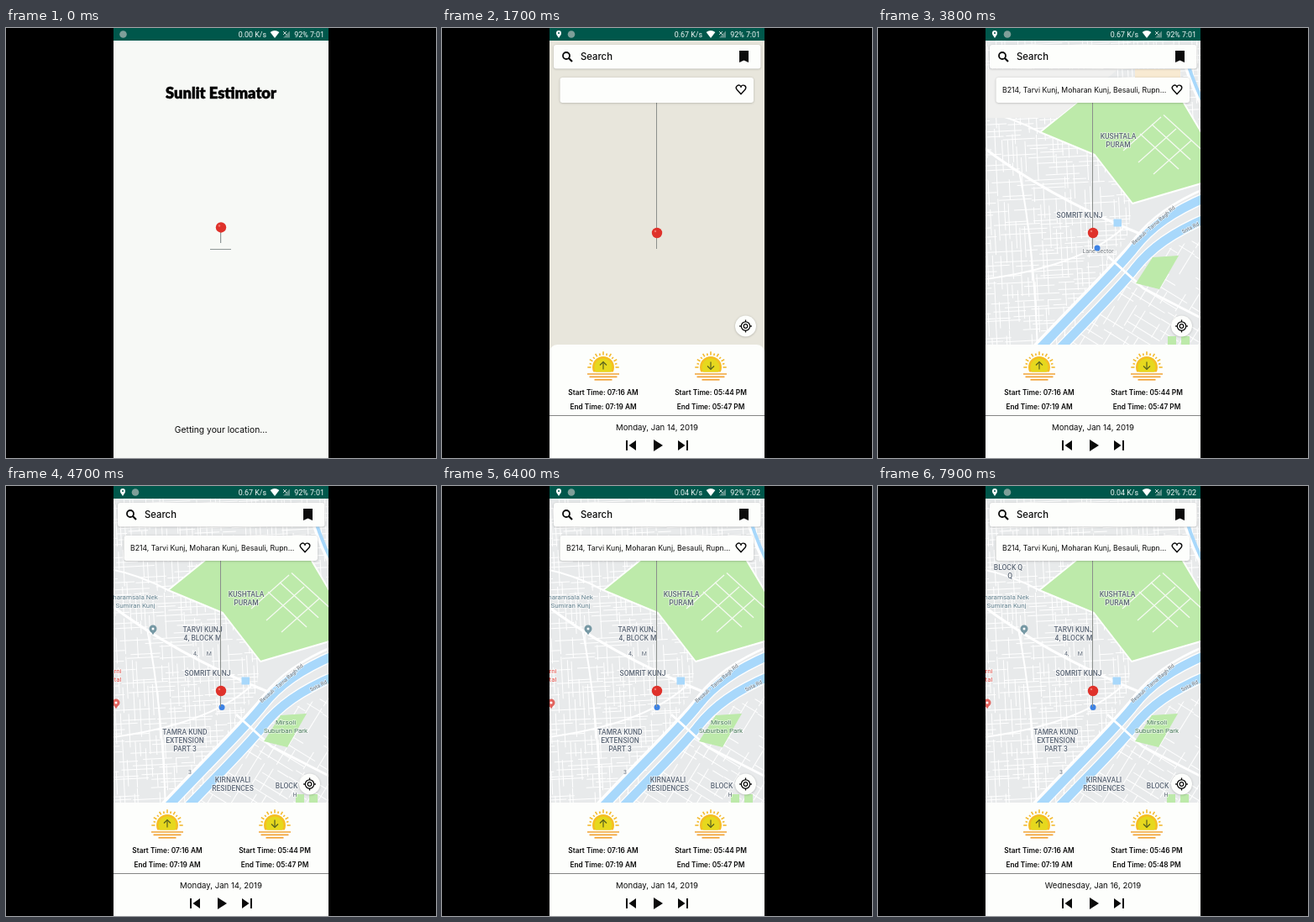
These frames come from a looping animation (512 by 512 pixels, 8 s). An HTML page with a canvas:

```html
<!DOCTYPE html>
<html lang="en">
<head>
<meta charset="utf-8">
<title>Sunlit Estimator</title>
<style>
html, body { margin: 0; width: 100%; height: 100%; overflow: hidden; background: #000; }
canvas { display: block; width: 100vw; height: 100vh; }
</style>
</head>
<body>
<canvas id="stage" width="512" height="512"></canvas>
<script>
const LOOP = 8000, TAU = Math.PI * 2;
const LEFT = 128, WIDTH = 256, MID = 256, TOP = 15, PANEL = 377;
const UI = 'Inter, "Open Sans", sans-serif', MAP = 'Roboto, Arial, sans-serif';
const INK = '#0b0b0b', WHITE = '#fdfefc', LAND = '#e8eaeb', WATER = '#a8d8fb', PARK = '#bdeaaa';
const SLATE = '#5d6877', TEAL = '#00574b';
const BIG = '500 8.5px ' + MAP, PLACE = '8px ' + MAP, SMALL = '7px ' + MAP;
const stage = document.getElementById('stage').getContext('2d');
let c = stage;

const ramp = (t, from, to) => Math.max(0, Math.min(1, (t - from) / (to - from)));
const mix = (a, b, k) => a + (b - a) * k;

function fill(color) { c.fillStyle = color; c.fill(); }
function stroke(color, width) { c.strokeStyle = color; c.lineWidth = width; c.stroke(); }
function trace(...pts) {
  c.beginPath();
  for (let i = 0; i < pts.length; i += 2) c.lineTo(pts[i], pts[i + 1]);
}
function poly(color, ...pts) { trace(...pts); fill(color); }
function line(color, width, ...pts) { trace(...pts); stroke(color, width); }
function rect(color, x, y, w, h) { c.fillStyle = color; c.fillRect(x, y, w, h); }
function circle(x, y, r) { c.beginPath(); c.arc(x, y, r, 0, TAU); }
function disc(color, x, y, r) { circle(x, y, r); fill(color); }
function ring(color, width, x, y, r) { circle(x, y, r); stroke(color, width); }
function curve(color, width, x0, y0, cx, cy, x1, y1) {
  c.beginPath();
  c.moveTo(x0, y0);
  c.quadraticCurveTo(cx, cy, x1, y1);
  stroke(color, width);
}
function text(str, x, y, font, color = INK, align = 'center') {
  c.font = font;
  c.textAlign = align;
  c.fillStyle = color;
  c.fillText(str, x, y);
}
function group(draw, alpha = 1) {
  if (alpha <= 0) return;
  c.save();
  c.globalAlpha *= alpha;
  draw();
  c.restore();
}
function clipBox(x, y, w, h) {
  c.beginPath();
  c.rect(x, y, w, h);
  c.clip();
}
function shadowed(draw) {
  group(() => {
    c.shadowColor = 'rgba(0,0,0,.25)';
    c.shadowBlur = 2.5;
    c.shadowOffsetY = 0.5;
    draw();
  });
}
function card(x, y, w, h) {
  shadowed(() => {
    c.beginPath();
    c.roundRect(x, y, w, h, 3);
    fill(WHITE);
  });
}
function rng(seed) {
  return () => (seed = (seed * 16807) % 2147483647) / 2147483647;
}

// Short broken streets running both ways around a centre
function streets(cx, cy, angle, span, gap, seed) {
  const rand = rng(seed);
  group(() => {
    c.translate(cx, cy);
    for (const turn of [angle, angle + TAU / 4]) {
      group(() => {
        c.rotate(turn);
        for (let y = -span; y < span; y += gap) {
          for (let x = -span; x < span;) {
            const len = 12 + rand() * 45, off = y + (rand() - 0.5) * 4;
            if (rand() < 0.68) line('#fff', 1, x, off, x + len, off);
            x += len + rand() * 8;
          }
        }
      });
    }
  });
}

function park() {
  trace(193, 124, 240, 86, 350, 66, 364, 89, 392, 136, 392, 183, 303, 209, 258, 151);
  c.closePath();
  fill(PARK);
  stroke('#fff', 2);
  for (let i = 0; i < 3; i++) {
    const a = 18 * i, b = 14 * i;
    line('#f4faf0', 1.4, 292 + a, 146 + b, 337 + a, 106 + b);
    line('#f4faf0', 1.4, 312 + b, 126 - b * 0.8, 358 + b, 168 - b * 0.8);
  }
}

function canal(color, width, shift) {
  c.beginPath();
  c.moveTo(392, 198 + shift);
  c.bezierCurveTo(350, 216 + shift, 325, 234 + shift, 306, 258 + shift);
  c.bezierCurveTo(290, 280 + shift, 240, 328 + shift, 184, 388 + shift);
  stroke(color, width);
}

function buildMap() {
  const layer = document.createElement('canvas');
  layer.width = layer.height = 512;
  c = layer.getContext('2d');
  c.lineJoin = 'round';
  rect(LAND, 0, 0, 512, 512);
  streets(190, 200, -0.05, 200, 6, 71);
  poly(LAND, 303, 205, 400, 170, 400, 400, 210, 400, 298, 245);
  group(() => {
    trace(400, 245, 330, 268, 215, 385, 400, 385);
    c.clip();
    streets(310, 330, 0.55, 120, 11, 19);
  });
  curve('#fff', 3, 120, 138, 200, 200, 312, 245);
  curve('#fff', 2, 168, 170, 186, 260, 190, 385);
  curve('#fff', 2, 120, 300, 240, 285, 292, 238);
  curve('#fff', 2, 120, 98, 160, 106, 193, 124);
  park();
  curve('#fff', 7, 366, 40, 376, 72, 394, 106);
  curve(WATER, 4, 368, 40, 378, 72, 394, 102);
  canal('#fff', 2.5, -8);
  for (const shift of [3, 28]) {
    canal('#fff', 13, shift);
    canal(WATER, 10.5, shift);
  }
  line('#fff', 3, 274, 272, 316, 310, 392, 349);
  rect(WATER, 280.5, 227.5, 9.5, 9);
  poly(PARK, 307, 304, 327, 273, 358, 271, 335, 311);
  for (const x of [345, 361]) rect(PARK, x, 367, 10, 12);
  c = stage;
  return layer;
}

function label(str, x, y, color = SLATE, font = BIG) {
  str.split('|').forEach((s, i) => {
    const base = y + 3 + i * 10;
    c.font = font;
    c.textAlign = 'center';
    c.lineWidth = 1.6;
    c.strokeStyle = 'rgba(255,255,255,.6)';
    c.strokeText(s, x, base);
    text(s, x, base, font, color);
  });
}
function roadName(str, x, y, angle) {
  group(() => {
    c.translate(x, y);
    c.rotate(angle);
    label(str, 0, -1, '#666d74', '6.3px ' + MAP);
  });
}
function marker(color, x, y, r = 4.5) {
  poly(color, x - r * 0.9, y + 1, x + r * 0.9, y + 1, x, y + r * 1.6);
  disc(color, x, y, r);
  disc('#fff', x, y, r / 3);
}

function detailLabels() {
  label('haramsala Nek|Sumiran Kunj', 154, 132, '#62808e', PLACE);
  marker('#7698a4', 175, 170);
  label('rni|tal', 133, 220, '#e2524b', PLACE);
  marker('#e2645e', 131, 258);
  label('TARVI KUNJ|4, BLOCK M', 234, 171);
  label('4,      M', 234, 199, SLATE, SMALL);
  label('TAMRA KUND|EXTENSION|PART 3', 213, 293);
  label('3', 219, 340, SLATE, SMALL);
  label('KIRNAVALI|RESIDENCES', 270, 350);
  label('BLOCK', 334, 357);
  label('H', 344, 367, SLATE, SMALL);
  label('Mirsoli|Suburban Park', 333, 281, '#48795a', PLACE);
}

let city;
function drawMap(t) {
  rect('#e8e6dc', LEFT, TOP, WIDTH, 375);
  group(() => {
    rect(WHITE, LEFT, PANEL, WIDTH, 13);
    clipBox(LEFT, TOP, WIDTH, PANEL - TOP);
    const detail = ramp(t, 4000, 4300), k = ramp(t, 3900, 4600);
    c.translate(-ramp(t, 6150, 6350), 0);
    c.drawImage(city, 0, 0);
    group(() => {
      poly('#f0f0ef', 120, 49, 286, 49, 214, 107, 120, 107);
      rect('#f8ead2', 306, 49, 54, 10);
      label('Lane Sector', 262, 265, '#777d83', SMALL);
    }, 1 - detail);
    label('KUSHTALA|PURAM', 286, 129);
    label('SOMRIT KUNJ', 240, 223);
    roadName('Besauli - Tarna Bagh Rd', 328, 235, -0.72);
    roadName('Sota Rd', 372, 238, -0.47);
    group(detailLabels, detail);
    group(() => label('BLOCK Q|  Q', 156, 97), ramp(t, 7200, 7400));
    disc('#3c82e4', mix(261, 257, k), mix(262, 263.5, k), 3.5);
  }, ramp(t, 2750, 2950));
}

function pinHead(y) {
  disc('#df322b', MID, y, 6.2);
  disc('#f0796f', MID - 2, y - 2, 1.2);
}

function statusBar(t, onMap) {
  rect(TEAL, LEFT, 0, WIDTH, TOP);
  const font = '8.9px ' + MAP, pale = '#f4f8f7';
  disc('#7f9f99', onMap ? 154 : 139.5, 7.5, 4.3);
  if (onMap) {
    poly('#fff', 136.2, 7.4, 141.8, 7.4, 139, 12);
    disc('#fff', 139, 6, 3);
    disc(TEAL, 139, 6, 1);
  }
  const rate = !onMap ? '0.00' : t < 5400 ? '0.67' : '0.04';
  text(rate + ' K/s', 310, 11, font, pale, 'right');
  c.beginPath();
  c.moveTo(320, 12);
  c.arc(320, 12, 8.8, -TAU * 0.355, -TAU * 0.145);
  fill('#fff');
  poly('#5f918a', 330, 11.5, 338, 11.5, 338, 3.5);
  line('#dce8e6', 0.9, 330, 4, 334, 8);
  line('#dce8e6', 0.9, 334, 4, 330, 8);
  text('92% ' + (t < 6300 ? '7:01' : '7:02'), 379, 11, font, pale, 'right');
}

function splash(t) {
  rect('#f7f9f6', LEFT, TOP, WIDTH, 497);
  const title = 'Sunlit Estimator';
  text(title, MID, 83.5, '900 18.3px Lato, sans-serif', '#000');
  c.strokeStyle = '#000';
  c.lineWidth = 0.5;
  c.strokeText(title, MID, 83.5);
  text('Getting your location...', MID, 481.5, '10.3px ' + UI);
  // The pin hops once a second, then rests on the ground line
  const lift = t < 1300 ? 5 * (1 - Math.cos((t - 300) / 1000 * TAU)) : 0;
  line('#8e9696', 1, 243, 263.5, 268, 263.5);
  line('#8e9696', 1.2, 255.6, 244 - lift, 255.6, 262.5 - lift);
  pinHead(244 - lift);
}

function sun(x, dir) {
  const y = 404;
  group(() => {
    clipBox(x - 20, y - 20, 40, 25.5);
    disc('#f5be22', x, y, 13);
    disc('#e6d81e', x, y, 10.5);
  });
  const rays = 12;
  for (let i = 0; i <= rays; i++) {
    const a = Math.PI * (1 + i / rays), far = i % 2 ? 17 : 18.7, dx = Math.cos(a), dy = Math.sin(a);
    line('#f3b92c', 1.6, x + dx * 14.5, y + dy * 14.5, x + dx * far, y + dy * far);
  }
  for (let i = 0; i < 3; i++) {
    const half = 19 - 1.7 * i * (i + 0.5);
    line('#f2a336', 1.7, x - half, y + 8 + i * 3.4, x + half, y + 8 + i * 3.4);
  }
  const tip = y - 2 - dir * 4.5;
  line('#55601f', 1.2, x, tip + dir * 9, x, tip);
  line('#55601f', 1.2, x - 4, tip + dir * 4, x, tip, x + 4, tip + dir * 4);
}

function times(x, start, end) {
  const font = '600 8.3px ' + UI;
  text('Start Time: ' + start, x, 437, font);
  text('End Time: ' + end, x, 454, font);
}
function triangle(x, dir, w, h) {
  poly(INK, x, 497 - h, x, 497 + h, x + dir * w, 497);
}

const DAYS = ['Monday', 'Tuesday', 'Wednesday'];
const nextAt = n => 6100 + 700 * n;

function panel(t) {
  c.beginPath();
  c.roundRect(LEFT, PANEL, WIDTH, 135, [9, 9, 0, 0]);
  fill(WHITE);
  const n = t < nextAt(1) ? 0 : t < nextAt(2) ? 1 : 2;
  sun(192, 1);
  sun(320, -1);
  times(192, '07:16 AM', '07:19 AM');
  times(320, `05:${44 + n} PM`, `05:${47 + (n >> 1)} PM`);
  line('#858585', 1, LEFT, 461.5, LEFT + WIDTH, 461.5);
  text(`${DAYS[n]}, Jan ${14 + n}, 2019`, MID, 478.7, '9.6px ' + UI);
  // Tap ripple under the next button
  for (const press of [1, 2]) {
    const k = (t - nextAt(press) + 100) / 350;
    if (k > 0 && k < 1) disc(`rgba(0,0,0,${0.16 * (1 - k)})`, 287, 497, 5 + 6 * k);
  }
  triangle(231, -1, 8.5, 6);
  triangle(252, 1, 11, 7);
  triangle(281, 1, 8.5, 6);
  for (const x of [219, 291]) rect(INK, x, 491, 2, 12);
}

function searchBar() {
  card(133, 20, 246.5, 28.5);
  ring(INK, 1.8, 148, 33, 4);
  line(INK, 2.2, 151, 36, 155, 40);
  text('Search', 165, 38.2, '500 11.3px ' + UI, INK, 'left');
  poly(INK, 354, 27, 365, 27, 365, 41, 359.5, 38.5, 354, 41);
}

function addressCard(t) {
  card(140.5, 59, 230.5, 30);
  if (t >= 2700) text('B214, Tarvi Kunj, Moharan Kunj, Besauli, Rupn...', 148, 76.7, '8.7px ' + UI, INK, 'left');
  c.beginPath();
  c.moveTo(356, 78.7);
  c.arc(353.3, 71.2, 3, Math.PI * 0.8, -0.4);
  c.arc(358.7, 71.2, 3, Math.PI + 0.4, Math.PI * 0.2);
  c.closePath();
  stroke(INK, 1.4);
}

function locateButton() {
  const x = 361.5, y = 355;
  shadowed(() => disc(WHITE, x, y, 12.5));
  ring(INK, 1.3, x, y, 5.2);
  ring(INK, 1.2, x, y, 2.3);
  for (const d of [-1, 1]) {
    line(INK, 1.3, x + d * 5, y, x + d * 7.5, y);
    line(INK, 1.3, x, y + d * 5, x, y + d * 7.5);
  }
}

function mapScreen(t) {
  drawMap(t);
  line('#8b8f8c', 1, 255.5, 89, 255.5, 263);
  pinHead(244);
  searchBar();
  addressCard(t);
  locateButton();
  panel(t);
}

function draw(t) {
  const onMap = t >= 1700;
  rect('#000', 0, 0, 512, 512);
  group(() => {
    clipBox(LEFT, 0, WIDTH, 512);
    (onMap ? mapScreen : splash)(t);
    statusBar(t, onMap);
  });
}

city = buildMap();
const begun = performance.now();
function tick() {
  draw((performance.now() - begun) % LOOP);
  requestAnimationFrame(tick);
}
tick();
</script>
</body>
</html>
```
